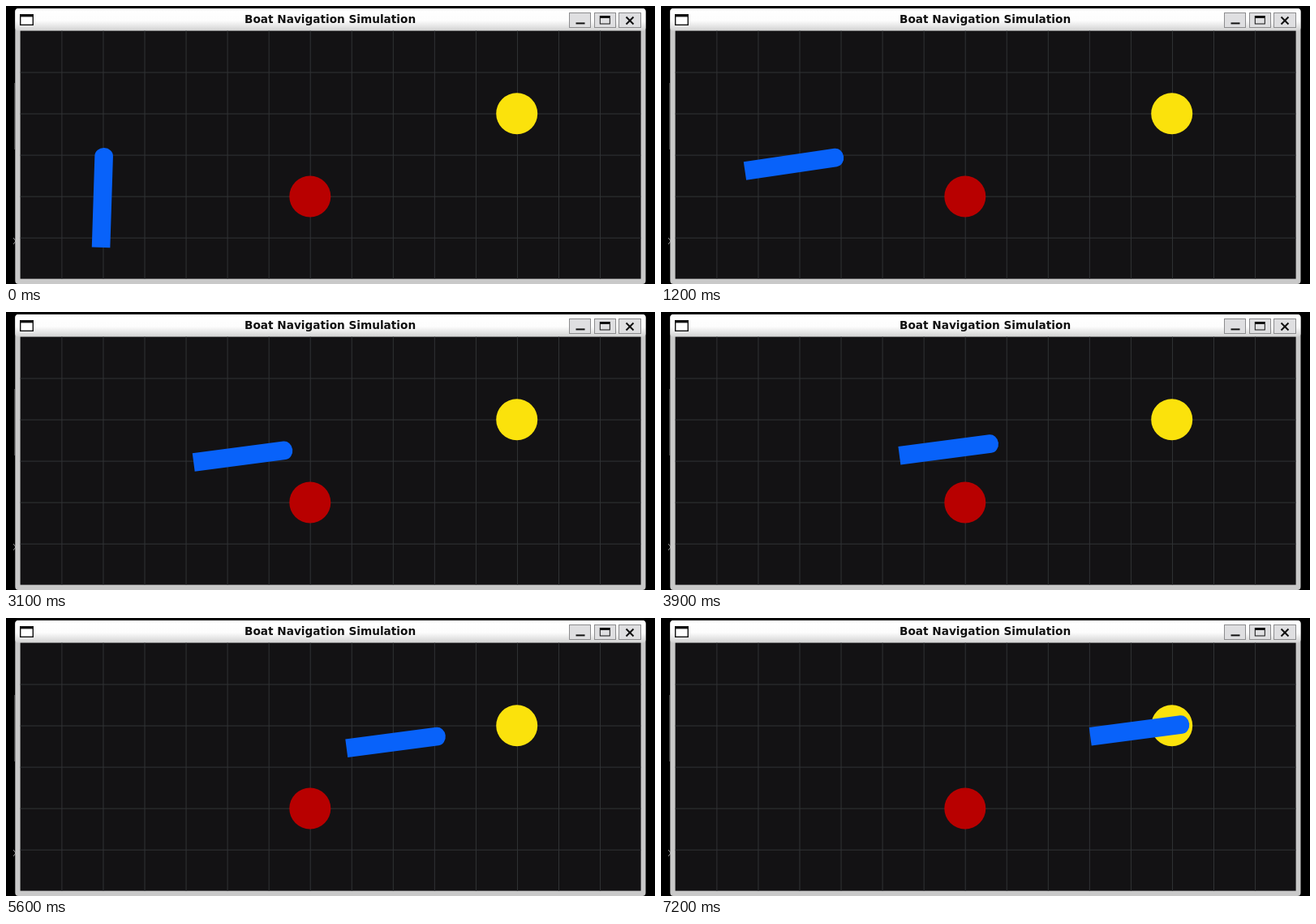
Recreate the animation shown at these times as an HTML page with a canvas. Size 800 by 343 pixels, loop 7300 ms.

```html
<!DOCTYPE html>
<html lang="en">
<head>
<meta charset="utf-8">
<title>Boat Navigation Simulation</title>
<style>
  html, body { margin: 0; width: 100%; height: 100%; overflow: hidden; background: #000; }
  canvas { display: block; }
</style>
</head>
<body>
<canvas id="stage" width="800" height="343"></canvas>
<script>
const ctx = document.getElementById('stage').getContext('2d');
const STEP = 100, STEPS = 73, CELL = 51.05;
const INK = '#111', FACE = '#dfdfe1';

const mix = (a, b, k) => a + (b - a) * Math.min(1, Math.max(0, k));

// The boat swings from facing up to its final course along an S-curve.
const heading = step => (7.5 + 83.2 / (1 + Math.exp((step - 5.2) / 1.5))) * Math.PI / 180;

// Slow while turning, then speeding up, then easing off near the goal.
function speed(step) {
  if (step < 22) return mix(5.9, 7.1, (step - 16) / 6);
  if (step < 38) return mix(7.1, 8.1, (step - 22) / 16);
  return mix(8.1, 6.9, (step - 38) / 18);
}

function boatAt(step) {
  let x = 119, y = 237;
  for (let s = 0.5; s < step; s++) {
    x += speed(s) * Math.cos(heading(s));
    y -= speed(s) * Math.sin(heading(s));
  }
  return { x, y, angle: -heading(step) };
}

function rect(x, y, w, h, color) {
  ctx.fillStyle = color;
  ctx.fillRect(x, y, w, h);
}

function disc(x, y, r, color) {
  ctx.fillStyle = color;
  ctx.beginPath();
  ctx.arc(x, y, r, 0, Math.PI * 2);
  ctx.fill();
}

function line(x1, y1, x2, y2, color, width) {
  ctx.strokeStyle = color;
  ctx.lineWidth = width;
  ctx.beginPath();
  ctx.moveTo(x1, y1);
  ctx.lineTo(x2, y2);
  ctx.stroke();
}

function roundBox(x, y, w, h, color) {
  ctx.fillStyle = color;
  ctx.beginPath();
  ctx.roundRect(x, y, w, h, 4);
  ctx.fill();
}

function miniWindow(x, y, w, h, fill, edge) {
  rect(x, y, w, h, INK);
  rect(x + edge, y + edge + 2, w - 2 * edge, h - 2 * edge - 2, fill);
}

function button(x, w) {
  rect(x, 8, w, 19, '#8c8c8e');
  rect(x + 1, 9, w - 2, 17, FACE);
}

function drawWindow() {
  rect(0, 0, 800, 343, '#000');
  rect(10, 95, 1, 82, '#444');
  line(9, 286, 12, 290, '#999', 1);
  line(12, 290, 9, 294, '#999', 1);
  roundBox(11.3, 3, 777.2, 340, '#c9c9c9');
  const bar = ctx.createLinearGradient(0, 3, 0, 30);
  bar.addColorStop(0, '#fff');
  bar.addColorStop(0.55, '#fdfdfd');
  bar.addColorStop(1, '#d4d4d4');
  roundBox(11.3, 3, 777.2, 27.6, bar);

  miniWindow(17, 10, 17, 14, '#fff', 1.4);
  ctx.fillStyle = INK;
  ctx.font = 'bold 13.65px "DejaVu Sans", sans-serif';
  ctx.textAlign = 'center';
  ctx.fillText('Boat Navigation Simulation', 399.6, 21);

  button(694, 27);
  button(725, 27);
  button(755, 28);
  rect(702.5, 20.4, 11, 2, INK);
  miniWindow(731.8, 12, 13, 10.5, FACE, 1);
  line(764.5, 13.5, 773.5, 22.5, INK, 2);
  line(773.5, 13.5, 764.5, 22.5, INK, 2);
}

function drawSea() {
  const left = 17.6, top = 30.6, width = 765, height = 306;
  rect(left, top, width, height, '#131214');
  for (let i = 0; i < 14; i++) rect(68.4 + i * CELL, top, 1, height, '#313335');
  for (let i = 0; i < 5; i++) rect(left, 81.5 + i * CELL, width, 1, '#313335');
  disc(374.8, 235, 25.5, '#b80000');
  disc(629.7, 132.7, 25.5, '#fbe20c');
}

function drawBoat(step) {
  const { x, y, angle } = boatAt(step);
  const stern = -61, bow = 52, half = 11.3;
  ctx.save();
  ctx.translate(x, y);
  ctx.rotate(angle);
  ctx.fillStyle = '#0862fa';
  ctx.beginPath();
  ctx.moveTo(stern, -half);
  ctx.lineTo(bow, -half);
  ctx.ellipse(bow, 0, 10, half, 0, -Math.PI / 2, Math.PI / 2);
  ctx.lineTo(stern, half);
  ctx.fill();
  ctx.restore();
}

function draw() {
  drawWindow();
  drawSea();
  drawBoat(Math.floor((performance.now() - start) / STEP) % STEPS);
  requestAnimationFrame(draw);
}

const start = performance.now();
draw();
</script>
</body>
</html>
```
